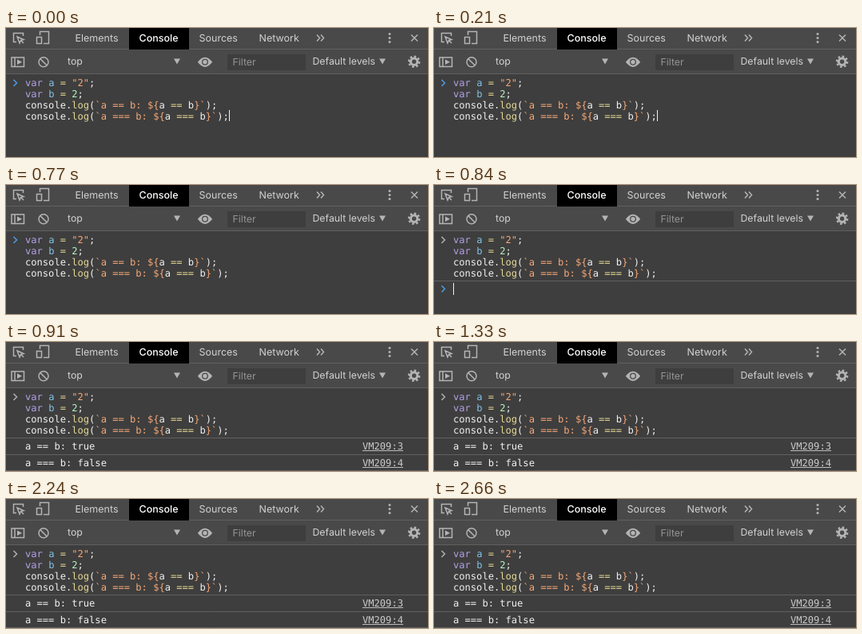
Recreate the animation shown at these times as an HTML page. Size 528 px wide and 162 px high, loop 2730 ms.

```html
<!DOCTYPE html>
<html lang="en">
<head>
<meta charset="utf-8">
<title>Console: == and ===</title>
<style>
  html, body { margin: 0; width: 100%; height: 100%; overflow: hidden; background: #3e3e3e; }
  svg { display: block; }
  text { white-space: pre; text-rendering: geometricPrecision; }
  .ui { font: 12.3px Inter, Roboto, sans-serif; fill: #d2d2d2; }
  .tabs { font-size: 12.5px; }
  .active { font-weight: 500; fill: #fff; }
  .hint { fill: #969696; }
  .code { font: 12.1px "DejaVu Sans Mono", monospace; fill: #f2f2f2; }
  .key { fill: #b3a0e6; }
  .def { fill: #82c4e8; }
  .op { fill: #e6d993; }
  .str { fill: #f6a877; }
  .num { fill: #b4f5c0; }
  .link { fill: #cacaca; }
  .line { fill: none; stroke: #b4b4b4; stroke-width: 1.5; }
  .rule { fill: none; stroke: #606060; }
  .solid { fill: #b4b4b4; }
  .cursor { fill: #f2f2f2; }
</style>
</head>
<body>
<svg width="528" height="162" viewBox="0 0 528 162">
  <rect width="528" height="162" fill="#3e3e3e"/>
  <rect width="528" height="57" fill="#494949"/>
  <path class="rule" d="M0 26.5H528M0 57.5H528"/>
  <rect x="154" width="75" height="27" fill="#000"/>

  <!-- tab bar -->
  <g class="ui tabs">
    <text x="86.5" y="17">Elements</text>
    <text class="active" x="166.5" y="17">Console</text>
    <text x="241.5" y="17">Sources</text>
    <text x="316.5" y="17">Network</text>
  </g>
  <path class="line" d="M13 17.5H9.5V6.5H21.5V10M14 11L22 14.500L18.500 15.500L17 19ZM18 15L22 19"/>
  <path class="line" d="M38.5 11.5H44.5V19.5H38.5ZM42.5 9V4.500H53.500V19.500H47"/>
  <path class="line" d="M389 8.500L392.500 12.500L389 16.500M394 8.500L397.500 12.500L394 16.500M507 8.500L515 16.500M515 8.500L507 16.500"/>
  <g class="solid">
    <circle cx="480" cy="7.5" r="1.5"/><circle cx="480" cy="12.5" r="1.5"/><circle cx="480" cy="17.5" r="1.5"/>
  </g>

  <!-- console toolbar -->
  <rect x="277" y="33" width="98" height="20" fill="#3e3e3e"/>
  <g class="ui">
    <text x="77" y="46">top</text>
    <text class="hint" x="283.5" y="47">Filter</text>
    <text x="383.5" y="46">Default levels</text>
  </g>
  <path class="line" d="M7 37H22.5V48.5H7ZM11 37V48.5"/>
  <path class="solid" d="M14 39.5L20 42.8L14 46ZM210 38.5H218L214 45.5ZM467 38.5H475L471 45.5Z"/>
  <circle class="line" cx="47" cy="42.8" r="6"/>
  <path class="line" d="M42.8 38.6L51.2 47"/>
  <path class="solid" fill-rule="evenodd" d="M239.8 42.8Q249 30.5 258.2 42.8Q249 55.1 239.8 42.8ZM245 42.8a4 4 0 1 0 8 0a4 4 0 1 0 -8 0Z"/>
  <circle class="solid" cx="249" cy="42.8" r="2.7"/>
  <g class="line" transform="translate(510.6 42.3)">
    <circle r="4.2" stroke-width="3" style="stroke-width:3"/>
    <circle r="6.6" pathLength="16" stroke-dasharray="1 1" style="stroke-width:2.4"/>
  </g>

  <!-- console body -->
  <g id="code" class="code"></g>
  <path id="chevron" class="line" d="M9.5 65L13.5 69L9.5 73"/>
  <rect id="caret" class="cursor" x="279" y="103" width="1" height="14"/>
  <g id="prompt">
    <path class="rule" d="M0 120.5H528"/>
    <path class="line" style="stroke:#4f9be0" d="M9.5 126.5L13.5 130.5L9.5 134.5"/>
    <rect class="cursor" x="24" y="123" width="1" height="15"/>
  </g>
  <g id="results" class="code">
    <path class="rule" d="M0 120.5H528M0 141.5H528M0 161.5H528"/>
    <text x="24" y="135">a == b: true</text>
    <text x="24" y="156">a === b: false</text>
    <text class="link" x="446" y="135">VM209:3</text>
    <text class="link" x="446" y="156">VM209:4</text>
    <path stroke="#bcbcbc" d="M446 136.5H497M446 157.5H497"/>
  </g>
</svg>
<script>
  const $ = id => document.getElementById(id);
  const span = (kind, text) => `<tspan class="${kind}">${text}</tspan>`;
  const declare = (name, value) =>
    `${span('key', 'var')} ${span('def', name)} ${span('op', '=')} ${value};`;
  const log = op =>
    `console.${span('op', 'log')}(${span('str', '`a ' + op + ' b: ${')}a ${span('op', op)} b${span('str', '}`')});`;

  $('code').innerHTML = [
    declare('a', span('str', '"2"')),
    declare('b', span('num', '2')),
    log('=='),
    log('===')
  ].map((line, i) => `<text x="24" y="${73 + 14 * i}">${line}</text>`).join('');

  const LOOP = 2730, BLINK = 350, ENTER = 840, OUTPUT = 910;
  const show = (id, on) => $(id).setAttribute('visibility', on ? 'visible' : 'hidden');

  function draw(now) {
    const t = now % LOOP;
    show('caret', t < BLINK);
    show('prompt', t >= ENTER && t < OUTPUT);
    show('results', t >= OUTPUT);
    $('chevron').style.stroke = t < ENTER ? '#4f9be0' : '#b0b0b0';
    requestAnimationFrame(draw);
  }
  draw(performance.now());
</script>
</body>
</html>
```
